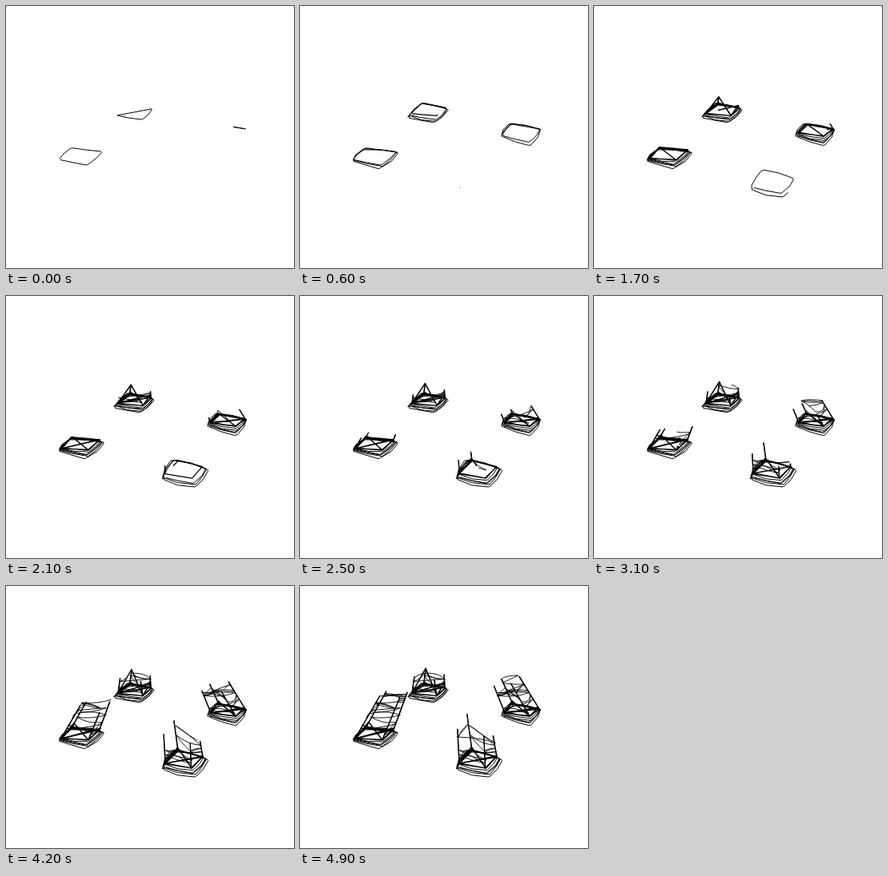
An HTML page for the animation above (5000 ms loop, 360 by 328 pixels).

```html
<!DOCTYPE html>
<html lang="en">
<head>
<meta charset="utf-8">
<title>Tower legs sketch</title>
<style>
html, body { margin: 0; width: 100%; height: 100%; overflow: hidden; background: #fff; }
svg { display: block; width: 360px; height: 328px; }
path { fill: none; stroke: #000; stroke-linejoin: round; }
</style>
</head>
<body>
<svg id="stage" viewBox="0 0 360 328"></svg>
<script>
const LOOP = 5000, STEP = 100, DONE = 4900, LAPS = 5;
const stage = document.getElementById('stage');
const items = [];

let seed = 11;
const rand = () => (seed = (seed * 16807) % 2147483647) / 2147483647;
const spread = r => (rand() * 2 - 1) * r;
const shake = (p, r) => p.map(v => v + spread(r));
const mix = (a, b, f) => a.map((v, i) => v + (b[i] - v) * f);
const clamp = v => Math.max(0, Math.min(1, v));
const progress = (t, t0, t1, power = 1) => clamp((t - t0) / (t1 - t0)) ** power;
const corners = s => s.split(' ').map(p => p.split(',').map(Number));
const line = pts => pts.length > 1
  ? 'M' + pts.map(p => p.map(v => v.toFixed(1)).join(' ')).join('L') : '';

function add(width, draw) {
  const el = document.createElementNS('http://www.w3.org/2000/svg', 'path');
  el.setAttribute('stroke-width', width);
  stage.append(el);
  items.push({ el, draw });
}

function reveal(pts, f) {
  const pos = f * (pts.length - 1), n = Math.floor(pos);
  if (pos === 0) return [];
  const shown = pts.slice(0, n + 1);
  if (pos > n) shown.push(mix(pts[n], pts[n + 1], pos - n));
  return shown;
}

// Rounded laps round the plinth; the first stays closed to its start while it grows.
function drawPlinth({ plinth, feet, first, start, built, pace }) {
  const pts = [], perLap = 12;
  for (let lap = 0; lap < LAPS; lap++) {
    const level = lap ? (lap - 1) / (LAPS - 1) : 0.4;
    const ring = plinth.map((p, k) => mix(p, feet[k], level));
    const centre = mix(ring[0], ring[2], 0.5);
    for (let k = first; k < first + 4; k++) {
      const a = ring[k % 4], b = ring[(k + 1) % 4];
      for (const f of [0.06, 0.5, 0.94]) {
        const p = mix(a, b, f);
        pts.push(shake(f === 0.5 ? mix(centre, p, 1.08) : p, 0.9));
      }
    }
  }
  add(1, t => {
    const shown = reveal(pts, progress(t, start, built, pace));
    return line(shown.length < perLap ? [...shown, pts[0]] : shown);
  });
}

function drawBed({ feet, built }) {
  const pts = [];
  for (let k = 0; k < 9; k++) pts.push(shake(feet[k % 4], 0.9));
  add(1.3, t => line(reveal(pts, progress(t, built - 600, built + 100))));
}

// Corner struts start one after another and are gone over twice.
function drawStruts({ feet, tops, order, rise, ease }) {
  order.forEach((k, i) => {
    for (const width of [1.4, 0.9]) {
      const foot = shake(feet[k], 0.6), top = shake(tops[k], 0.6);
      add(width, t => {
        const f = progress(t, rise + i * 400, DONE, ease);
        return f ? line([foot, mix(foot, top, f)]) : '';
      });
    }
  });
}

// A heavy zigzag over the bed, hung from the back corner.
function drawBraces({ feet, tops, apex, built, rise, ease }) {
  const [a, b, c, d] = feet;
  add(1.5, t => {
    const f = apex * progress(t, rise, DONE, ease);
    const peak = mix(d, tops[3], f);
    return line(reveal([a, peak, b, mix(c, tops[2], f / 3), a, c], progress(t, built - 200, built + 900)));
  });
}

// Curved hops between the corners that climb to the given share of the height.
function drawLattice({ feet, tops, rise, ease, fill, hops }) {
  const pts = [];
  let last;
  for (let i = 0; i <= hops; i++) {
    const k = (i * 2 + (i >> 2) + (i & 1)) % 4;
    const level = fill * clamp(i / hops + spread(0.14));
    const node = shake(mix(feet[k], tops[k], level), 1.5);
    if (last) {
      const ctrl = shake(mix(last, node, 0.5), 5);
      for (const f of [0.25, 0.5, 0.75]) pts.push(mix(mix(last, ctrl, f), mix(ctrl, node, f), f));
    }
    pts.push(node);
    last = node;
  }
  add(0.9, t => line(reveal(pts, progress(t, rise + 400, DONE, ease))));
}

// Corners run left, front, right, back.
const legs = [
  { plinth: corners('65,193 100,204 124,184 79,179'),
    feet: corners('69,191 103,193 117,180 82,177'),
    tops: corners('100,137 125,139 134,133 108,132'),
    first: 0, start: -280, built: 1200, pace: 1,
    order: [0, 2, 3, 1], rise: 1700, ease: 1, apex: 0.15, fill: 1, hops: 32 },
  { plinth: corners('134,139 168,147 186,129 152,121'),
    feet: corners('140,134 171,137 181,127 155,123'),
    tops: corners('143,113 168,117 180,111 157,103'),
    first: 0, start: -110, built: 1100, pace: 1,
    order: [3, 2, 0, 1], rise: 1300, ease: 0.35, apex: 1, fill: 0.75, hops: 18 },
  { plinth: corners('251,163 288,175 302,154 262,147'),
    feet: corners('256,159 287,163 299,154 267,149'),
    tops: corners('242,125 263,122 274,113 252,116'),
    first: 2, start: -20, built: 1200, pace: 1,
    order: [2, 0, 3, 1], rise: 1300, ease: 0.8, apex: 0.15, fill: 1, hops: 30 },
  { plinth: corners('195,230 237,240 254,217 207,205'),
    feet: corners('199,222 232,228 246,214 215,206'),
    tops: corners('197,179 230,188 241,187 209,160'),
    first: 0, start: 450, built: 2400, pace: 3,
    order: [0, 3, 1, 2], rise: 1800, ease: 0.65, apex: 0.1, fill: 0.75, hops: 18 }
];

for (const leg of legs) {
  for (const draw of [drawPlinth, drawBed, drawStruts, drawBraces, drawLattice]) draw(leg);
}

function render(time) {
  const t = Math.floor((time % LOOP) / STEP) * STEP;
  for (const { el, draw } of items) el.setAttribute('d', draw(t));
}

let origin;
function tick(now) {
  origin ??= now;
  render(now - origin);
  requestAnimationFrame(tick);
}
render(0);
requestAnimationFrame(tick);
</script>
</body>
</html>
```
